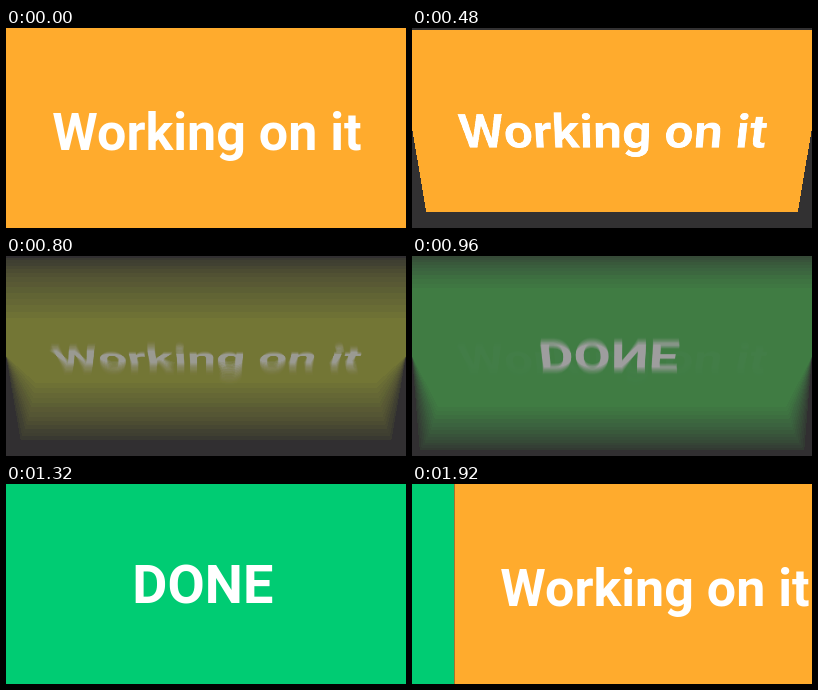
An HTML page with a canvas for the animation above (1960 ms loop, 400 by 200 pixels).

```html
<!DOCTYPE html>
<html lang="en">
<head>
<meta charset="utf-8">
<title>Working on it</title>
<style>
  html, body { margin: 0; width: 100%; height: 100%; overflow: hidden; background: #323132; }
  canvas { display: block; width: 400px; height: 200px; }
</style>
</head>
<body>
<canvas id="stage" width="400" height="200"></canvas>
<script>
const W = 400, H = 200, LOOP = 1960, STEP = 40, DEPTH = 560;
const ORANGE = '#ffab2d', GREEN = '#00cc73', DARK = '#323132';
const ctx = document.getElementById('stage').getContext('2d');

// The panel face is kept at double size so that tilted text stays smooth.
const face = document.createElement('canvas');
face.width = W * 2;
face.height = H * 2;
const fc = face.getContext('2d');
fc.scale(2, 2);

const clamp = v => Math.max(0, Math.min(1, v));
const ramp = (t, a, b) => clamp((t - a) / (b - a));
const wave = u => (1 - Math.cos(Math.PI * u)) / 2;

// Nearest and farthest tilt, in degrees, smeared together at a given time.
const TILT_LOW = [[120, 0], [480, 25.4], [800, 26], [960, 13], [1080, 10], [1240, 0]];
const TILT_HIGH = [[120, 0], [480, 25.4], [800, 72], [960, 55], [1080, 16], [1240, 0]];

function along(keys, t) {
  for (let i = 1; i < keys.length; i++) {
    const [t0, a] = keys[i - 1], [t1, b] = keys[i];
    if (t < t1) {
      const u = ramp(t, t0, t1);
      return a + (b - a) * (i === 1 ? wave(u) : u);
    }
  }
  return 0;
}

function label(c, text, size, x, y, alpha) {
  c.globalAlpha = alpha;
  c.fillStyle = '#fff';
  c.font = `700 ${size}px Roboto, sans-serif`;
  c.textAlign = 'center';
  c.fillText(text, x, y);
  c.globalAlpha = 1;
}

const working = (c, alpha = 1) => label(c, 'Working on it', 52, 201, 122, alpha);
const done = (c, alpha = 1) => label(c, 'DONE', 54, 196.8, 119, alpha);

function fill(c, color, alpha = 1) {
  c.globalAlpha = alpha;
  c.fillStyle = color;
  c.fillRect(0, 0, W, H);
  c.globalAlpha = 1;
}

function paintFace(c, t) {
  fill(c, ORANGE);
  fill(c, GREEN, ramp(t, 660, 1110));
  working(c, 1 - ramp(t, 775, 966));
  c.save();
  if (t < 1040) {
    c.translate(0, H);
    c.scale(1, -1);
  }
  done(c, ramp(t, 840, 960));
  c.restore();
}

// Draws the face row by row, its lower edge leaning away.
function drawTilted(degrees, alpha) {
  const a = degrees * Math.PI / 180, cd = Math.cos(a) * DEPTH, s = Math.sin(a);
  fill(ctx, DARK, alpha);
  ctx.globalAlpha = alpha;
  for (let y = 0; y < H; y++) {
    const dy = y + 0.5 - H / 2, q = cd - dy * s;
    if (q <= 0) continue;
    const v = dy * DEPTH / q, dv = cd * DEPTH / (q * q);
    if (Math.abs(v) > H / 2 + dv / 2) continue;
    const k = DEPTH / (DEPTH + v * s);
    const top = Math.max(0, v + H / 2 - dv / 2);
    const bottom = Math.min(H, v + H / 2 + dv / 2);
    if (bottom - top < 0.05) continue;
    ctx.drawImage(face, 0, top * 2, W * 2, (bottom - top) * 2,
      W / 2 * (1 - k), y, W * k, 1);
  }
  ctx.globalAlpha = 1;
}

function flip(t) {
  const low = along(TILT_LOW, t), high = along(TILT_HIGH, t);
  if (high < 0.2) return paintFace(ctx, t);
  paintFace(fc, t);
  const n = high - low > 1 ? 14 : 1;
  for (let i = 0; i < n; i++) {
    drawTilted(low + (high - low) * (n > 1 ? i / (n - 1) : 0), 1 / (i + 1));
  }
}

function slide(t) {
  const u = ramp(t, 1680, LOOP);
  const eased = 0.57 * u + 0.43 * u * u * (3 - 2 * u);
  const x = Math.round(W * (1 - eased));
  ctx.save();
  ctx.translate(x - W, 0);
  fill(ctx, GREEN);
  done(ctx);
  ctx.translate(W, 0);
  fill(ctx, ORANGE);
  working(ctx);
  ctx.fillStyle = 'rgba(50, 49, 50, 0.45)';
  ctx.fillRect(0, 0, 1, H);
  ctx.restore();
}

function render(now) {
  const t = Math.floor((now % LOOP) / STEP) * STEP;
  if (t < 1720) flip(t);
  else slide(t);
}

const start = performance.now();
function tick() {
  render(performance.now() - start);
  requestAnimationFrame(tick);
}
render(0);
requestAnimationFrame(tick);
</script>
</body>
</html>
```
